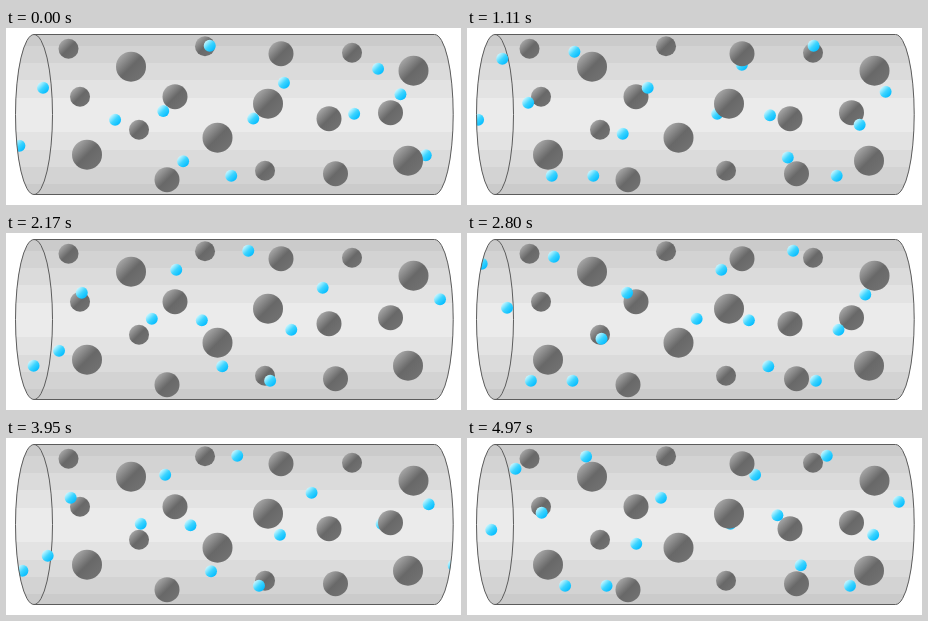
These frames come from a looping animation (455x177 px, 5070 ms). An HTML page with a canvas:

```html
<!DOCTYPE html>
<html lang="en">
<head>
<meta charset="utf-8">
<title>Electrons drifting through a wire</title>
<style>
html, body { margin: 0; width: 100%; height: 100%; overflow: hidden; background: #fff; }
canvas { display: block; }
</style>
</head>
<body>
<canvas id="stage" width="455" height="177"></canvas>
<script>
const ctx = document.getElementById('stage').getContext('2d');
const LOOP = 5070, STEP = 30;
const ENTRY = -11.4, EXIT = 468.6; // ends of every electron's trip
const ELECTRON = 6;

// Trips made by a given time, in ms
const progress = [[0, 0], [2170, 0.58], [2800, 0.754], [4410, 1.182], [4970, 1.324]];

const atoms = (r, ...centers) => centers.map(([x, y]) => ({ x, y, r }));
const small = atoms(10, [62.5, 21], [199, 18.5], [346, 25], [74, 69], [133, 102], [259, 143]);
const medium = atoms(12.5, [275, 26], [169, 69], [323, 91], [384.5, 85], [161, 152], [329.5, 146]);
const large = atoms(15, [125, 39], [407.5, 43], [262, 76], [211.5, 110], [81, 127], [402, 133]);

// An electron flies level until it touches an atom, then slides round to its top or bottom and flies on.
function lane(slot, y, ...hits) {
  const parts = [];
  let x = ENTRY, length = 0;
  const add = (size, at) => {
    parts.push({ size, at });
    length += size;
  };
  const fly = (toX) => {
    const x0 = x, y0 = y;
    add(toX - x0, d => [x0 + d, y0]);
  };
  for (const atom of hits) {
    const reach = atom.r + ELECTRON, side = Math.sign(y - atom.y);
    const angle = Math.acos((y - atom.y) * side / reach);
    fly(atom.x - reach * Math.sin(angle));
    add(reach * angle, d => {
      const a = angle - d / reach;
      return [atom.x - reach * Math.sin(a), atom.y + side * reach * Math.cos(a)];
    });
    x = atom.x;
    y = atom.y + side * reach;
  }
  fly(EXIT);
  return { phase: slot / 20, parts, length };
}

function pointAt({ parts, length }, trip) {
  let d = trip % 1 * length;
  for (const { size, at } of parts) {
    if (d <= size) return at(d);
    d -= size;
  }
}

const backLanes = [lane(6, 31, small[0], small[2]), lane(5, 92, small[4])];
const middleLanes = [lane(8, 148, medium[4], medium[5])];
const frontLanes = [
  lane(9, 24, large[0]),
  lane(2, 60, large[2], large[1]),
  lane(7, 75, medium[1], medium[2], medium[3]),
  lane(1, 118, large[4], large[3], large[2]),
  lane(10, 133, large[4])
];

const body = new Path2D('M28 6.5H428.5A18.7 80 0 0 1 428.5 166.5H28A18.5 80 0 0 1 28 6.5Z');
const rim = new Path2D('M28 6.5A18.5 80 0 0 1 28 166.5');

function ball(x, y, r, ...colors) {
  const k = r * 0.75;
  y -= 0.3;
  const fill = ctx.createLinearGradient(x - k, y - k, x + k, y + k);
  colors.forEach((color, i) => fill.addColorStop(i / (colors.length - 1), color));
  ctx.fillStyle = fill;
  ctx.beginPath();
  ctx.arc(x, y, r, 0, 7);
  ctx.fill();
}

function drawAtoms(group) {
  for (const { x, y, r } of group) ball(x, y, r, '#a8a8a8', '#686868', '#727272');
}

// Two electrons share each lane, half a trip apart.
function drawLanes(lanes, trips) {
  for (const l of lanes) {
    for (const half of [0, 0.5]) {
      const [x, y] = pointAt(l, l.phase + trips + half);
      ball(x, y, ELECTRON, '#d4f9ff', '#3cd4ff', '#00baff');
    }
  }
}

function drawBands() {
  for (let i = 4; i >= 0; i--) {
    const half = Math.round(17.3 * (i + 1)), grey = 235 - 8 * i;
    ctx.fillStyle = `rgb(${grey},${grey},${grey})`;
    ctx.fillRect(0, 87 - half, 455, 2 * half);
  }
}

function tripsAt(t) {
  const i = Math.max(1, progress.findIndex(key => key[0] > t));
  const [t0, p0] = progress[i - 1], [t1, p1] = progress[i];
  return p0 + (p1 - p0) * Math.floor((t - t0) / STEP) * STEP / (t1 - t0);
}

function draw(t) {
  const end = progress.at(-1);
  const trips = t < end[0] ? tripsAt(t) : end[1];
  ctx.clearRect(0, 0, 455, 177);
  ctx.strokeStyle = '#5c5c5c';
  ctx.save();
  ctx.clip(body);
  drawBands();
  ctx.stroke(rim);
  drawLanes(backLanes, trips);
  drawAtoms([...small, ...medium]);
  drawLanes(middleLanes, trips);
  drawAtoms(large);
  drawLanes(frontLanes, trips);
  ctx.restore();
  ctx.stroke(body);
}

const begin = performance.now();
function tick() {
  draw((performance.now() - begin) % LOOP);
  requestAnimationFrame(tick);
}
tick();
</script>
</body>
</html>
```
